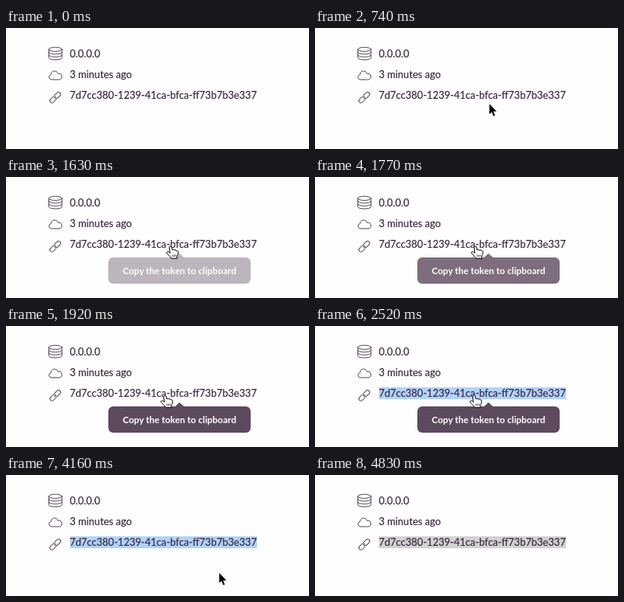
These frames come from a looping animation (379x152 px, 5.69 s). An HTML page:

```html
<!DOCTYPE html>
<html lang="en">
<head>
<meta charset="utf-8">
<title>Copy token</title>
<style>
  html, body { margin: 0; width: 100%; height: 100%; overflow: hidden; background: #fefefe; }
  svg { display: block; width: 379px; height: 152px; font-family: Lato, sans-serif; }
  .icon { fill: none; stroke: #56465a; stroke-linecap: round; stroke-linejoin: round; }
  .info { font-size: 12.6px; fill: #3d2841; stroke: #3d2841; stroke-width: .2; }
  .tip { font-size: 11.5px; font-weight: 700; fill: #fff; text-anchor: middle; }
</style>
</head>
<body>
<svg viewBox="0 0 379 152">
  <rect id="selection" x="80" y="77" width="234" height="15"/>

  <g class="icon">
    <ellipse cx="61.8" cy="26.8" rx="8.2" ry="2.6"/>
    <path d="M53.6 26.8V37.4c0 3.4 16.4 3.4 16.4 0V26.8
             M53.6 30.4c0 3.4 16.4 3.4 16.4 0M53.6 33.9c0 3.4 16.4 3.4 16.4 0"/>
    <path d="M56.5 64.8A3.1 3.1 0 0 1 56.2 58.7C56.4 52.9 63.6 52.6 65 57.4A3.8 3.8 0 0 1 67.2 64.8Z"/>
    <g transform="translate(61.6 87.3) rotate(-45)">
      <path id="link" d="M-1.2 2.6H-5.8A2.6 2.6 0 0 1 -5.8 -2.6H-1.8A2.6 2.6 0 0 1 .8 .6"/>
      <use href="#link" transform="rotate(180)"/>
    </g>
  </g>

  <g class="info">
    <text x="79.7" y="37">0.0.0.0</text>
    <text x="79.7" y="63.2">3 minutes ago</text>
    <text x="79.7" y="89.2">7d7cc380-1239-41ca-bfca-ff73b7b3e337</text>
  </g>

  <g id="tooltip">
    <rect x="128" y="101" width="178" height="33" rx="6" fill="#5d4a5e"/>
    <path d="M211.5 101L217 96L222.5 101Z" fill="#5d4a5e"/>
    <text class="tip" x="217" y="122">Copy the token to clipboard</text>
  </g>

  <circle id="ring" cy="84.5" r="9.8" fill="none" stroke="#222" stroke-width="1.3"/>

  <path id="arrow" stroke="#fff" stroke-width="1.4" paint-order="stroke"
        d="M1.2 1.2V14L4.1 11.3L6.2 16.4L8.2 15.6L6.1 10.6H10.2Z"/>

  <g id="hand" fill="#fff" stroke="#000" stroke-linejoin="round">
    <path d="M5.2 9.6L4.3 3A1.45 1.45 0 0 1 7.1 1.9L8.3 6C8.5 4.8 10.6 4.9 10.9 6.2C11.3 5.2 13.2 5.5 13.4 6.9
             C14.2 6.3 15.4 7 15.4 8.3C15.5 11 14.4 12.2 14 13.6V16.3H6.6C6 14.4 3.2 12.2 1.2 9.8C.2 8.4 2 6.9 3.5 8.2Z"/>
    <path d="M8.3 11.5v2.8m2-2.8v2.8m2-2.8v2.8" stroke-width=".7"/>
  </g>
</svg>
<script>
  const LOOP = 5690, TICK = 147.5;
  const ENTER = 442.5, HOVER = 1622, SELECT = 2520, LEAVE = 3860, BLUR = 4830;
  const EXIT_PATH = [[204, 86], [234, 93], [265.5, 121.8], [271, 138]];

  const part = id => document.getElementById(id);
  const show = (id, opacity) => part(id).setAttribute("opacity", Number(opacity));
  const ticksSince = (start, ms) => Math.floor((ms - start) / TICK);

  // The pointer glides in, settles on the token, then sweeps off to the lower right.
  function pointerAt(ms) {
    if (ms < HOVER) {
      const k = Math.min(6, ticksSince(ENTER, ms));
      return [222 - 2.5 * k, 84 + 55 * (1 - k / 7) ** 5];
    }
    if (ms < LEAVE) {
      const u = Math.min(1, ticksSince(HOVER, ms) / 2);
      return [193 + 7 * (1 - u) ** 2, 86];
    }
    return EXIT_PATH[Math.min(3, ticksSince(LEAVE, ms))];
  }

  function draw(now) {
    const ms = now % LOOP;
    const gone = LEAVE + 2 * TICK;
    const hovering = ms >= HOVER && ms < gone;
    const visible = ms >= ENTER && ms < LEAVE + 4 * TICK;
    const clicking = [HOVER - 2 * TICK, SELECT - TICK].some(start => ms >= start && ms < start + TICK);

    for (const id of ["arrow", "hand"]) part(id).setAttribute("transform", `translate(${pointerAt(ms)})`);
    show("arrow", visible && !hovering);
    show("hand", hovering);
    show("tooltip", hovering ? Math.min(1, 0.4 * (1 + ticksSince(HOVER, ms))) : 0);

    show("ring", clicking);
    part("ring").setAttribute("cx", ms < HOVER ? 209.5 : 199.5);

    show("selection", ms >= SELECT);
    part("selection").setAttribute("fill", ms < BLUR ? "#b0d3fb" : "#d2d2d2");
  }

  function loop(now) {
    draw(now);
    requestAnimationFrame(loop);
  }
  draw(0);
  requestAnimationFrame(loop);
</script>
</body>
</html>
```
